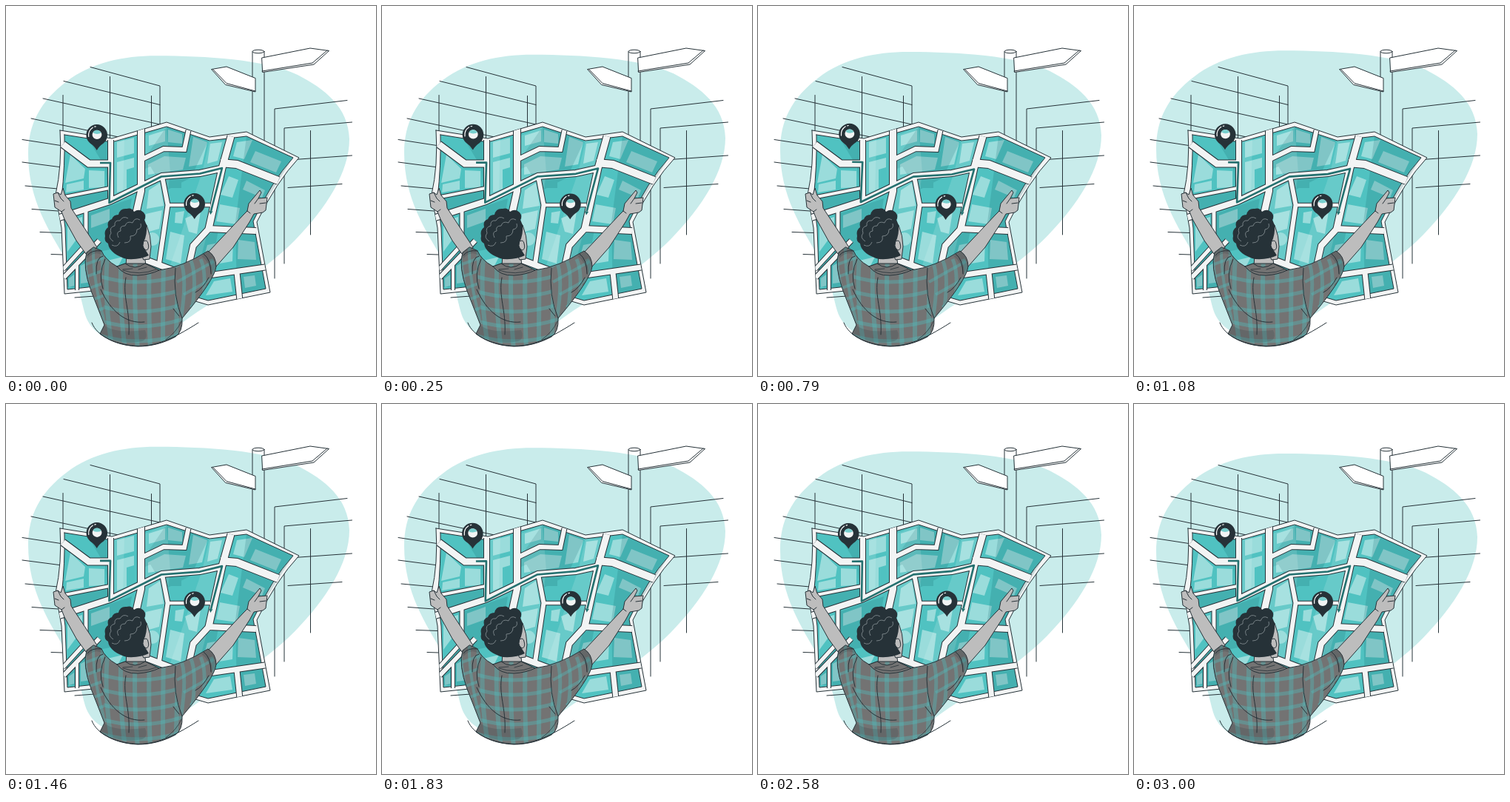
Recreate the animation shown at these times as an HTML page. Size 500 by 500 pixels, loop 3040 ms.

```html
<!DOCTYPE html>
<html lang="en">
<head>
<meta charset="utf-8">
<title>Reading a map</title>
<style>
html, body { margin: 0; width: 100%; height: 100%; overflow: hidden; background: #fff; }
svg { display: block; width: 100vw; height: 100vh; }
.ink { fill: none; stroke: #263238; stroke-width: 1; stroke-linejoin: round; stroke-linecap: round; }
.white { fill: #fff; }
.skin { fill: #bdbdbd; }
.paper { fill: #f2f4f4; }
.teal { fill: #50c2c1; }
.shirt { fill: #737373; }
.hair { fill: #263238; }
.pin { fill: #263238; }
.plaid path { fill: none; stroke: #54b9ba; stroke-opacity: .4; }
</style>
</head>
<body>
<svg viewBox="0 0 500 500">
  <defs>
    <clipPath id="inner"><path d="M79 174 143 184 217 163 275 182 325 176 388 205 334 291 351 382 273 398 185 372 83 383 80 300 75 260Q80 215 79 174Z"/></clipPath>
    <clipPath id="sheet"><path d="M73 168 143 179 217 157 275 177 325 170 396 205 339 292 357 387 273 404 185 378 79 389 75 300 67 255Q76 215 73 168Z"/></clipPath>
    <clipPath id="torso"><path d="M129 331Q134 343 150 352L161 348H188L207 357Q238 353 273 331Q284 338 284 352Q282 370 238 422Q239 440 229 447C212 456 195 460 178 460C155 459 139 452 127 443L133 431 115 385Q103 352 109 333L118 326Z"/></clipPath>
    <clipPath id="sleeveL"><path d="M100 320H130L134 345Q126 360 131 382L134 430 118 400Z"/></clipPath>
    <clipPath id="sleeveR"><path d="M229 352 275 328 290 345 284 370 238 422Q226 390 229 352Z"/></clipPath>
    <clipPath id="body"><path d="M134 340Q126 360 131 382L134 431 124 445 180 462 237 446 238 422Q226 390 229 350L200 340H150Z"/></clipPath>
    <g id="marker">
      <path class="pin" d="M0 20.5Q-3 15-9 11A14.3 14.3 0 1 1 9 11Q3 15 0 20.5Z"/>
      <ellipse cx=".3" cy="-.6" rx="6.4" ry="6.1" fill="#f2f4f4"/>
      <path d="M-5.2-3.2Q0 0 6-3Q4-6.8 0-6.8T-5.2-3.2Z" fill="#78cfce"/>
      <path d="M-11 2Q-12-6-5.5-10.3M-3-11.3-1.5-11.7" fill="none" stroke="#fff" stroke-width="1.2" stroke-linecap="round"/>
    </g>
  </defs>

  <path id="blob" fill="#c9eceb" d="M205 67.3C160 67 116 76 82 102C46 129 30 160 30 200C30 263 59 304 82 345C99 377 101 396 107 417C114 440 137 455 167 455C206 454 225 437 252 418C287 394 349 359 391 316C433 273 464 224 464 180C463 137 431 112 394 93C350 72 269 67.5 205 67.3Z"/>

  <path class="ink" d="M114 82.5 208 108V160M78 101.5 208 133.5M50 125 208 160M34 152 152 177M22 180.5 74 188.5M22 211 72 217.5M26 243 70 247M35 274.5 70 277M46 305.5 75 306.5M61 335.5 76 336M93 394 120 392M77 120.5V172M140.5 95.5V182M196.5 121.5V166
    M363 368V139L461 127.5M376 348V165L467.5 157M390 207.5 467.5 202M381 245.5 454 240.5M411.5 168.5V309"/>

  <path class="ink" d="M333 62V176M349 62V184"/>
  <ellipse class="ink" cx="341" cy="61.5" rx="8" ry="2.3"/>
  <g class="ink">
    <path class="white" d="M346 70 411 57 436.500 60.500 416 79 347 89.500Z"/>
    <path d="M346 88 414 77 434 60"/>
    <path class="white" d="M278 85.500 298 82 337 97.500V116L297 106.500Z"/>
    <path d="M280 86 298 104.500 337 115"/>
  </g>

  <path class="ink paper" d="M73 168 143 179 217 157 275 177 325 170 396 205Q365 238 339 292L357 387 273 404 185 378 79 389 75 300 67 255Q76 215 73 168Z"/>
  <path class="ink teal" d="M79 174 143 184 217 163 275 182 325 176 388 205Q358 238 334 291L351 382 273 398 185 372 83 383 80 300 75 260Q80 215 79 174Z"/>

  <g clip-path="url(#inner)">
    <path fill="#fff" fill-opacity=".42" d="M87 201 107 220 105 233 80 239ZM112 222 133 223V245L112 246ZM82 241 105 236V248L81 252ZM150 184 173 178V199L150 205ZM150 211 173 205V218L163 221V247L150 252Z
      M193 175 215 168V183L193 189ZM219 167 238 173V186L219 184ZM192 214 214 203 243 205 239 221 192 228ZM247 217 253 177 272 184 265 214ZM276 186 292 184 286 209 272 213ZM337 196 372 210 365 225 330 211ZM312 184 333 181 322 207 307 203Z
      M301 230 314 235 306 259 290 255ZM325 236 350 249 346 259 320 248ZM289 268 316 273 312 295 284 291ZM115 283 140 274V291L115 300ZM193 249 208 239 213 270 190 274ZM189 281 211 276 207 301 186 307Z
      M229 279 241 277 238 294 228 293ZM242 287 263 278 258 308 247 305ZM222 305 241 310 236 348 216 342ZM314 316 336 319 338 343 313 342ZM272 323 307 316 306 345 264 352ZM321 366 336 364 338 378 323 381ZM281 372 303 368 306 386 270 391Z
      M83 291 103 285V305L83 332ZM85 368 92 363V378L85 380ZM101 351 112 345 116 373 101 375ZM133 345 158 339 148 359Z"/>
    <circle cx="198" cy="315" r="9" fill="#fff" fill-opacity=".35"/>
    <path fill="#0c6265" fill-opacity=".18" d="M110 178 143 184 139 260 87 276 80 258 137 247 134 218ZM217 163 247 172 273 183 250 232 215 250 188 205ZM325 176 388 205 334 291 351 382 312 391 310 292ZM220 238H237V246H220ZM109 281 170 260 160 325 112 335ZM83 345 105 324 130 348 120 380H83ZM258 315 287 303 282 330 255 350ZM188 206 214 197 238 198 188 220Z"/>
    <path fill="#fff" fill-opacity=".13" d="M217 163 188 175V250L165 360 205 350 222 225ZM275 182 265 225 222 350 258 360 305 182ZM143 184 160 179 158 255 143 264Z"/>
  </g>
  <g id="roads" clip-path="url(#sheet)" fill="none" stroke-linejoin="miter"></g>

  <g id="route">
    <path d="M127 212H141L139.500 266 210 230.500 262 226.500 292 219 277 277" fill="none" stroke="#24706f" stroke-width="2.6" stroke-linejoin="round"/>
    <path d="M274 276.500 279.500 277.500 276.300 282Z" fill="#24706f"/>
    <use href="#marker" x="122.700" y="174.500"/>
    <use href="#marker" x="254.700" y="267.500"/>
  </g>

  <g class="ink">
    <path class="skin" d="M108 335 95 317 79 288 75 278 66 272 64 254 70 252 74 255 77 246 80 256 87 264 88 273 123 326Z"/>
    <path d="M70 252 74 260 78 264M75 278 79 275M66 263 71 265"/>
    <path class="skin" d="M273 333 321 282 326 277 328 267 343 249 345 252 341 260 353 259 351 276 347 279 335 281 329 292 307 326 284 352Z"/>
    <path d="M341 260 336 267M351 266 343 267M326 277 330 280"/>
    <path class="skin" d="M163 335 162 352Q174 358 189 351L187 334Z"/>
    <path class="skin" d="M183 292 190 296Q196 311 196 325L194 342 186 343 177 325Z"/>
  </g>
  <path class="hair" d="M190 296Q191 309 186 319L188 329 193 337Q182 343 164 342C151 339 139 331 138 321Q132 318 134 311Q132 303 138 299Q136 290 143 288Q145 282 152 282Q154 273 163 274Q170 272 173 278Q180 273 186 279Q190 284 187 289Z"/>
  <path class="ink skin" d="M186 318Q191 315 192 321Q194 328 190 330Q186 329 185 324Z"/>
  <path d="M145 318Q137 313 142 307Q139 299 147 297Q146 289 154 290Q158 283 165 287M152 313Q148 305 155 304Q153 297 161 297Q163 290 171 293Q174 285 181 289M160 320Q170 320 168 311Q177 311 177 302Q184 301 182 294M143 323Q151 327 154 319" fill="none" stroke="#8b9598" stroke-width=".8"/>

  <g clip-path="url(#torso)">
    <path class="shirt" d="M95 315H295V465H95Z"/>
    <g id="plaid" class="plaid"></g>
    <path fill="#263238" fill-opacity=".18" d="M133 431Q145 443 188 438Q193 449 184 453Q155 459 127 443ZM109 333 118 326 129 331 131 338Q121 329 110 341ZM264 338 273 331Q284 338 284 354L277 363Q275 345 264 338Z"/>
  </g>
  <path class="ink" d="M129 331Q134 343 150 352L161 348H188L207 357Q238 353 273 331Q284 338 284 352Q282 370 238 422Q239 440 229 447C212 456 195 460 178 460C155 459 139 452 127 443L133 431 115 385Q103 352 109 333L118 326Z"/>
  <g class="ink">
    <path d="M129 331Q116 329 110 337M131 338Q121 339 122 362M267 335Q277 342 277 362M134 342Q124 362 131 382M229 354Q225 391 238 422M226 409 234 419M128 383C141 412 162 430 187 427M162 367C157 393 168 410 166 444M274 367Q266 382 256 387"/>
    <path fill="#737373" d="M150 352 161 348Q174 358 188 348L207 357Q195 363 178 364 160 365 150 352Z"/>
    <path d="M158 357Q180 365 203 356M158 356 171 355M179 356 190 353" stroke-width=".8"/>
    <path d="M116 428C123 447 151 459 180 459.500C203 459 222 452 260 428"/>
    <path d="M237 426Q231 440 216 451" stroke-width=".7"/>
  </g>
</svg>
<script>
const LOOP = 3040;
const byId = id => document.getElementById(id);
const path = (d, attrs) => `<path d="${d}" ${attrs}/>`;
const span = (n, draw) => Array.from({ length: n }, (_, i) => draw(i)).join("");

const roads = [
  ["M77 187 112 213H140", 9],
  ["M141.500 181V266", 7],
  ["M182.500 164V250L168 315", 9],
  ["M74 259 140 246", 4],
  ["M72 286 140 264 211 230 262 226 294 219", 8],
  ["M304 176 292 219 274 301", 9],
  ["M184 207 213 193 241 194 246.500 168", 6],
  ["M290 212 312 214 368 236", 10],
  ["M211 230 218.500 269 207 348", 6],
  ["M218 269H276", 4.500],
  ["M338 304 274 301 253 324 244 365", 8],
  ["M186 342 236 361", 8],
  ["M260 366 350 353", 7],
  ["M312 360 316 398", 7],
  ["M108 276V322L77 356", 5],
  ["M78 367 126 317", 6],
  ["M96 348V384", 4]
];
const roadLayer = (color, extra) => roads.map(([d, w]) =>
  path(d, `stroke="${color}" stroke-width="${w + extra}"`)).join("");
byId("roads").innerHTML = roadLayer("#263238", 2) + roadLayer("#f2f4f4", 0);

const stripes = (n, draw, width = 5) => span(n, i => path(draw(i), `stroke-width="${width}"`));
const panel = (name, lines) => `<g clip-path="url(#${name})">${lines}</g>`;
byId("plaid").innerHTML =
  panel("body",
    stripes(6, i => `M${137 + i * 19} 340Q${132 + i * 20} 395 ${144 + i * 17} 465`, 6) +
    stripes(5, i => `M120 ${363 + i * 20}Q180 ${384 + i * 20} 245 ${361 + i * 20}`)) +
  panel("sleeveL",
    stripes(3, i => `M${106 + i * 12} 325Q${106 + i * 11} 370 ${126 + i * 8} 430`, 4) +
    stripes(5, i => `M100 ${352 + i * 17}L136 ${339 + i * 17}`, 4)) +
  panel("sleeveR",
    stripes(4, i => `M${222 + i * 9} ${356 + i * 17}L${272 + i * 9} ${328 + i * 17}`, 4) +
    stripes(4, i => `M${235 + i * 14} 342Q${246 + i * 14} 365 ${236 + i * 13} 425`));

// Triangle wave: 0, 1, 0, -1 at successive quarters of the loop.
const swing = p => 1 - Math.abs(((p + .25) % 1) * 4 - 2);

function render(now) {
  const p = (now % LOOP) / LOOP;
  const lift = 10 * (1 - Math.abs(1 - 2 * p));
  byId("blob").setAttribute("transform", `translate(0 ${-lift})`);
  byId("route").setAttribute("transform", `rotate(${swing(p)} 200 224)`);
  requestAnimationFrame(render);
}
render(0);
</script>
</body>
</html>
```
